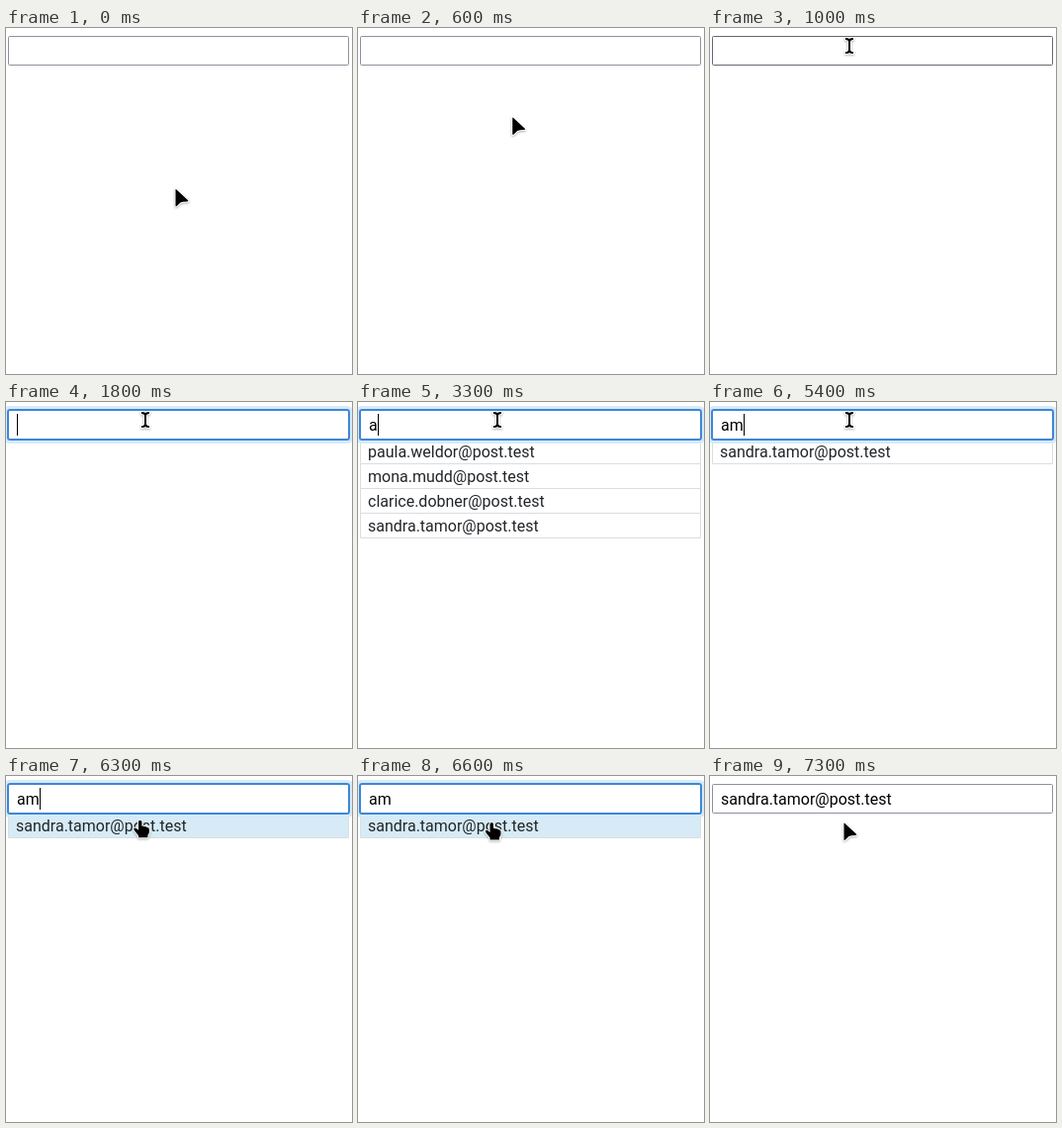
These frames come from a looping animation (350 by 350 pixels, 8 s). An HTML page:

```html
<!DOCTYPE html>
<html lang="en">
<head>
<meta charset="utf-8">
<title>Email autocomplete</title>
<style>
  html, body { margin: 0; width: 100%; height: 100%; overflow: hidden; background: #fff; }
  svg { display: block; width: 100vw; height: 100vh; }
  text { font: 16px Roboto, Arial, sans-serif; }
  .row { fill: #212529; }
  .rule { fill: none; stroke: #dddde0; }
  .pointer { fill: #000; stroke: #fff; stroke-width: 2; stroke-linejoin: round; paint-order: stroke;
    filter: drop-shadow(0 1px 1px rgba(0, 0, 0, .3)); }
</style>
</head>
<body>
<svg viewBox="0 0 350 350">
  <g id="list"></g>
  <rect id="border" x="2.5" y="8.5" width="344" height="29" rx="1" fill="#fff"/>
  <g id="focus" fill="none">
    <rect x="-.5" y="5.5" width="350" height="35" rx="4" stroke="#d5ebf9" stroke-width="3"/>
    <rect x="2" y="8" width="345" height="30" rx="2" fill="#fff" stroke="#3f86d8" stroke-width="2"/>
  </g>
  <text id="value" x="11" y="29"></text>
  <rect id="caret" y="12" width="1" height="22"/>
  <path id="pointer" class="pointer"/>
</svg>
<script>
const DURATION = 8000;
const EMAILS = [
  'paula.weldor@post.test',
  'mona.mudd@post.test',
  'clarice.dobner@post.test',
  'sandra.tamor@post.test'
];
// Pointer outlines, drawn around their hotspot
const SHAPES = {
  arrow: 'M0 .8Q0-.5 1 .4L12.6 11.2Q13.4 12.3 12 12.4Q7 12.4 5 13.6L1.4 17Q0 18 0 16.5Z',
  beam: 'M-4-8Q-1-8 0-7Q1-8 4-8V-6Q1-6 1-4V4Q1 6 4 6V8Q1 8 0 7Q-1 8-4 8V6Q-1 6-1 4V-4Q-1-6-4-6Z',
  hand: 'M-2 1Q-2-.5-.3-.5Q1.5-.5 1.5 1V5.5Q3 4.8 4 6Q5.7 5.3 6.5 6.8Q9 6.5 9 9V11' +
    'Q9 13 7.5 14.5V17H-2V15L-6 10Q-7.5 8-6 7.3Q-4.5 7-2 9.5Z'
};

const el = id => document.getElementById(id);
const [list, border, focus, value, caret, pointer] =
  ['list', 'border', 'focus', 'value', 'caret', 'pointer'].map(el);

const smooth = p => p * p * (3 - 2 * p);
const easeOut = p => 1 - (1 - p) ** 3;

// Progress of a move that advances once every 100 ms
const stepped = (t, start, steps) =>
  Math.max(0, Math.min(steps, Math.floor((t - start) / 100) + 1)) / steps;

function hotspot(t) {
  const up = smooth(stepped(t, 300, 8));
  const down = easeOut(stepped(t, 6000, 7));
  return [171.5 - 30.5 * up - 5.5 * down, 163 - 145 * up + 29.5 * down];
}

function listMarkup(emails, hovered) {
  return emails.map((email, i) => {
    const bottom = 62.5 + 25 * i;
    const fill = hovered && i === 0 ? '#d6ebf5' : '#fff';
    return `<rect x="3" y="${bottom - 24.5}" width="343" height="24" fill="${fill}"/>
      <path class="rule" d="M2.5 ${bottom - 25}V${bottom}H346.5V${bottom - 25}"/>
      <text class="row" x="10" y="${bottom - 6.5}">${email}</text>`;
  }).join('');
}

function typedText(t) {
  if (t >= 7300) return EMAILS[3];
  return t >= 4100 ? 'am' : t >= 3300 ? 'a' : '';
}

function caretOn(t) {
  return (t >= 1800 && t < 3000) || (t >= 3300 && t < 4200) || (t >= 5400 && t < 6600);
}

function show(node, visible) {
  node.setAttribute('visibility', visible ? 'visible' : 'hidden');
}

let lastList = '';

function render(t) {
  const [x, y] = hotspot(t);
  const text = typedText(t);
  const open = t >= 3300 && t < 7300;
  const overInput = y >= 8 && y < 38;
  const overRow = open && y >= 38;

  const markup = open ? listMarkup(EMAILS.filter(e => e.includes(text)), overRow) : '';
  if (markup !== lastList) list.innerHTML = lastList = markup;

  border.setAttribute('stroke', overInput ? '#676774' : '#8f8f9d');
  show(focus, t >= 1800 && t < 7200);
  value.textContent = text;
  caret.setAttribute('x', { '': 11, a: 20, am: 34 }[text] ?? 0);
  show(caret, caretOn(t));
  pointer.setAttribute('d', SHAPES[overInput ? 'beam' : overRow ? 'hand' : 'arrow']);
  pointer.setAttribute('transform', `translate(${x} ${y})`);
}

const start = performance.now();
function tick() {
  render((performance.now() - start) % DURATION);
  requestAnimationFrame(tick);
}
tick();
</script>
</body>
</html>
```
